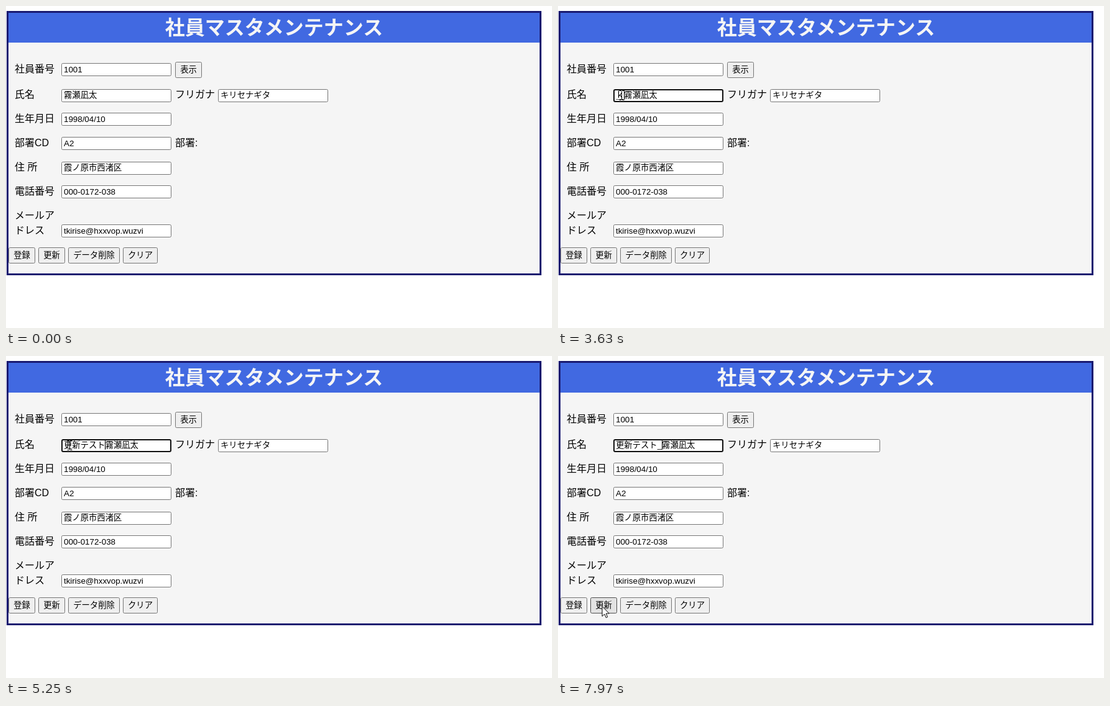
An HTML page that plays this animation: 878x519 px, repeating every 8 s.

```html
<!DOCTYPE html>
<html lang="ja">
<head>
<meta charset="utf-8">
<style>
html, body { margin: 0; width: 100%; height: 100%; overflow: hidden; background: #fff; }
svg { display: block; font: 16px "Liberation Sans", "Noto Sans CJK JP", "Noto Sans CJK", sans-serif; }
.title { font-size: 32px; font-weight: 700; fill: #f5f5f5; text-anchor: middle; }
.small { font-size: 13.333px; }
.mid { text-anchor: middle; }
.field { fill: #fff; stroke: #767676; }
.button { fill: #efefef; stroke: #767676; }
.button.hover { fill: #e3e3e3; stroke: #4f4f4f; }
.field.hover { stroke: #4f4f4f; }
.field.focus { stroke: #101010; stroke-width: 2; }
.item { font-size: 14.667px; }
.kana { font-size: 13px; letter-spacing: -1.9px; }
</style>
</head>
<body>
<svg width="878" height="519" viewBox="0 0 878 519">
  <rect x="2.5" y="9.5" width="857" height="423" fill="#f5f5f5" stroke="#191970" stroke-width="3"/>
  <rect x="4" y="11" width="854" height="48" fill="#4169e1"/>
  <text class="title" x="431" y="46">社員マスタメンテナンス</text>
  <g id="form"></g>
  <g id="entry">
    <text id="typed" class="small" x="93" y="148"></text>
    <text id="tail" class="small" y="148">霧瀬凪太</text>
    <path id="underline" stroke="#000"/>
    <path id="caret" stroke="#000"/>
  </g>
  <g id="list">
    <rect x="61.5" y="152.5" width="186" height="161" fill="#fff" stroke="#ccc"/>
    <g id="items"></g>
  </g>
  <path id="beam" d="M-4 -7.5H-1L0 -6.5L1 -7.5H4M0 -6.5V6.5M-4 7.5H-1L0 6.5L1 7.5H4" fill="none" stroke="#000"/>
  <path id="arrow" d="M.5 .5V16.5L4.3 13L6.8 18.8L9.2 17.7L6.8 12H11.8Z" fill="#fff" stroke="#000"/>
</svg>
<script>
const LOOP = 8000, BLINK = 525, FOCUS = 1180;
const $ = id => document.getElementById(id);
const show = (el, on) => el.setAttribute('visibility', on ? 'visible' : 'hidden');

function add(tag, attrs, text = '') {
  const el = document.createElementNS('http://www.w3.org/2000/svg', tag);
  for (const k in attrs) el.setAttribute(k, attrs[k]);
  el.textContent = text;
  $('form').append(el);
  return el;
}

// Static form
const boxes = [];
function box(kind, x, y, w, h) {
  const el = add('rect', { class: kind, x: x + .5, y: y + .5, width: w - 1, height: h - 1, rx: 2 });
  boxes.push({ el, kind, x, y, w, h });
  return el;
}
function field(x, y, value) {
  const el = box('field', x, y, 177, 21);
  const base = /[^ -~]/.test(value) ? 14 : 15;
  add('text', { class: 'small', x: x + 4, y: y + base }, value);
  return el;
}
function button(x, y, w, text) {
  box('button', x, y, w, 26);
  add('text', { class: 'small mid', x: x + w / 2, y: y + 17 }, text);
}
const label = (x, mid, text) => add('text', { x, y: mid + 6 }, text);

['社員番号', '氏名', '生年月日', '部署CD', '住 所', '電話番号', 'メールア']
  .forEach((text, i) => label(14, [101, 142, 181, 220, 259, 298, 337][i], text));
label(14, 361, 'ドレス');
label(272, 142, 'フリガナ');
label(272, 220, '部署:');
field(89, 92, '1001');
const nameField = field(89, 134, '');
field(341, 134, 'キリセナギタ');
field(89, 172, '1998/04/10');
field(89, 211, 'A2');
field(89, 251, '霞ノ原市西渚区');
field(89, 289, '000-0172-038');
field(89, 352, 'tkirise@hxxvop.wuzvi');
button(272, 90, 43, '表示');
button(4, 389, 43, '登録');
button(52, 389, 43, '更新');
button(100, 389, 83, 'データ削除');
button(188, 389, 56, 'クリア');

// Typing: [time, text, mode]; mode 1 = composing, 2 = converted
const keys = [
  [FOCUS, ''], [2240, 'k'], [2300, 'ko'], [2570, 'kou'],
  [2900, 'ko'], [3010, 'k'], [3170, ''],
  [3630, 'ｋ', 1], [3720, 'こ', 1], [3830, 'こう', 1], [3950, 'こうｓ', 1], [4050, 'こうし', 1],
  [4180, 'こうしｎ', 1], [4250, 'こうしん', 1], [4310, 'こうしんｔ', 1], [4380, 'こうしんて', 1],
  [4450, 'こうしんてｓ', 1], [4580, 'こうしんてす', 1], [4720, 'こうしんてすｔ', 1],
  [4800, 'こうしんてすと', 1], [4930, '更新テスト', 2], [5190, '更新テスト'], [5250, '更新テスト'],
  [5710, '更新テスト_']
];
const guesses = {
  'こ': '今回 この こと これ ここ',
  'こう': '更新 こうして 効果 公開 交渉',
  'こうし': '更新した こうしんするよ 香辛料 更新 交渉',
  'こうしん': '更新 更新した こうしんするよ 香辛料 行進',
  'こうしんて': '更新テスト 更新点 更新手順 更新底 更新定期',
  'こうしんてす': '更新テスト 更新です 更新ですが 更新手数 更新'
};

// Pointer way points: [time, x, y]
const path = [
  [195, 571, 396], [260, 430, 290], [325, 260, 200], [390, 150, 150], [455, 114, 144],
  [725, 114, 144], [780, 108, 143], [1050, 108, 143], [1170, 102, 144], [6640, 102, 144],
  [6760, 110, 405], [6890, 110, 405], [6955, 100, 440], [7085, 75, 456], [7320, 47, 420],
  [7520, 47, 420], [7605, 36, 408], [7930, 71, 403]
];
function pointer(t) {
  t = Math.floor(t / 65) * 65;
  const i = path.findIndex(p => p[0] > t);
  if (i < 0) return path.at(-1).slice(1);
  if (i === 0) return null;
  const [a, b] = [path[i - 1], path[i]], f = (t - a[0]) / (b[0] - a[0]);
  return [1, 2].map(k => Math.round(a[k] + (b[k] - a[k]) * f));
}

function drawEntry(t) {
  const [time, text, mode] = keys.findLast(k => k[0] <= t) || [0, ''];
  $('typed').textContent = text;
  const end = 93 + (text && $('typed').getComputedTextLength());
  const x = Math.floor(end) + .5;
  $('tail').setAttribute('x', end);
  $('caret').setAttribute('d', `M${x} 136V151`);
  show($('caret'), t >= FOCUS && Math.floor((t - time) / BLINK) % 2 === 0);

  const line = $('underline');
  show(line, mode);
  line.setAttribute('d', `M94 150.5H${end - 1}`);
  line.setAttribute('stroke-width', mode === 2 ? 2 : 1);
  line.setAttribute('stroke-dasharray', mode === 2 ? 'none' : '2 1');

  const reading = Object.keys(guesses).findLast(k => text.startsWith(k));
  show($('list'), mode === 1 && reading);
  $('items').innerHTML = mode === 1 && reading ? guesses[reading].split(' ').map((s, i) =>
    `<text class="item" x="96" y="${174 + i * 32}">` +
    s.replace(/[\u3040-\u30ff]+/g, '<tspan class="kana">$&</tspan>') + '</text>').join('') : '';
}

function drawPointer(t) {
  const p = pointer(t);
  let beam = false;
  for (const b of boxes) {
    const over = p && p[0] >= b.x && p[0] < b.x + b.w && p[1] >= b.y && p[1] < b.y + b.h;
    b.el.classList.toggle('hover', !!over);
    if (over && b.kind === 'field') beam = true;
  }
  show($('beam'), p && beam);
  show($('arrow'), p && !beam);
  if (!p) return;
  $('beam').setAttribute('transform', `translate(${p[0] + .5} ${p[1]})`);
  $('arrow').setAttribute('transform', `translate(${p[0] - .5} ${p[1]})`);
}

function setFocus(on) {
  nameField.classList.toggle('focus', on);
  const inset = on ? 1 : .5;
  nameField.setAttribute('x', 89 + inset);
  nameField.setAttribute('y', 134 + inset);
  nameField.setAttribute('width', 177 - 2 * inset);
  nameField.setAttribute('height', 21 - 2 * inset);
}

function draw() {
  const t = performance.now() % LOOP;
  setFocus(t >= FOCUS);
  drawEntry(t);
  drawPointer(t);
  requestAnimationFrame(draw);
}
draw();
</script>
</body>
</html>
```
